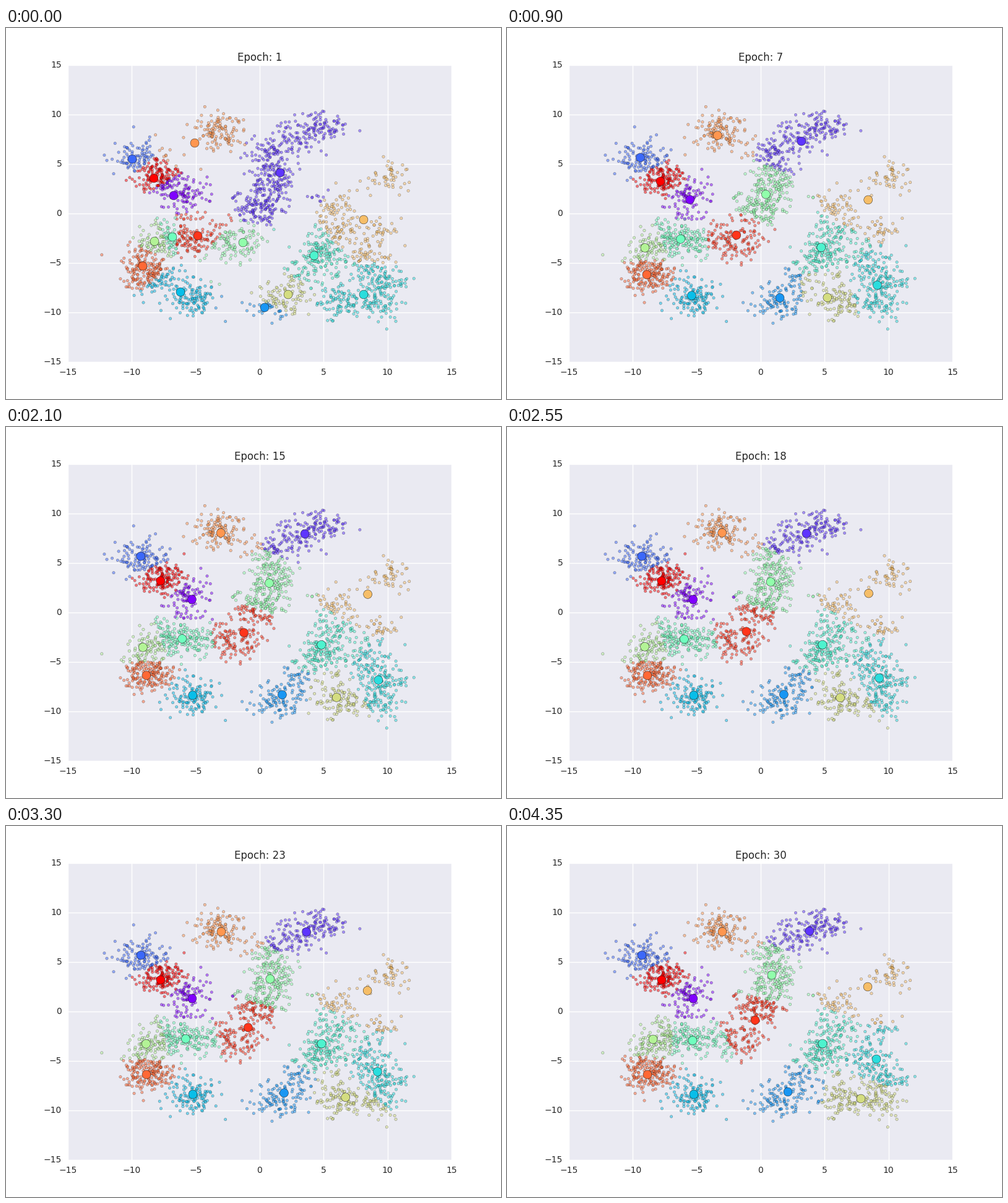
Write a matplotlib script that moves like this. It is 800 px wide and 600 px high and loops after 4.5 s.

```python
import numpy as np
import matplotlib.pyplot as plt
from matplotlib.animation import FuncAnimation

EPOCHS = 30
STEP_MS = 150
SPREAD = 0.97   # standard deviation of every blob
SETTLE = 3.5    # epochs for the quick early motion to fade
INK = "#262626"

plt.rcParams["font.family"] = "DejaVu Sans"
rng = np.random.default_rng(7)

# Blob centre and number of points
BLOBS = [
    (10.3, 3.8, 50), (5.8, 0.9, 55), (9.4, -1.9, 45), (9.6, -6.4, 95),
    (8.0, -4.3, 60), (9.2, -9.0, 85), (6.2, -8.8, 90), (4.5, -4.0, 125),
    (5.9, -2.2, 80), (3.4, -7.0, 65), (1.2, -9.0, 85), (-1.6, -2.9, 95),
    (-4.4, -2.5, 80), (-6.8, -2.5, 145), (-9.0, -3.6, 70), (-8.8, -6.1, 180),
    (-5.2, -8.4, 125), (-7.7, 3.5, 155), (-5.6, 1.6, 90), (-9.5, 5.7, 105),
    (-3.3, 8.3, 120), (0.8, 5.8, 95), (1.2, 3.4, 110), (0.1, 0.7, 150),
    (3.2, 7.9, 75), (5.0, 8.6, 75),
]

# Centroids on the stage: start, resting place and, for some, a late goal
PATHS = [
    [(271, 271), (301, 279)],
    [(443, 234), (483, 172), (489, 170)],
    [(204, 212), (218, 209)],
    [(418, 452), (446, 433), (454, 430)],
    [(282, 427), (302, 434)],
    [(578, 431), (603, 413), (597, 377)],
    [(498, 368), (510, 352)],
    [(269, 338), (283, 342), (300, 347)],
    [(383, 347), (426, 252), (428, 241)],
    [(240, 345), (219, 358), (236, 345)],
    [(456, 431), (531, 437), (572, 441)],
    [(578, 310), (585, 271), (583, 260)],
    [(305, 186), (348, 171)],
    [(221, 385), (227, 402)],
    [(310, 336), (384, 335), (401, 314)],
    [(239, 243), (250, 249)],
]
START, REST, GOAL = (
    np.array([path[min(i, len(path) - 1)] for path in PATHS], dtype=float)
    for i in range(3))


def centroids(epoch):
    """Quick decay from start to rest, then a slow drift to the goal."""
    age = epoch - 1
    decay = np.exp(-age / SETTLE)
    drift = (age / (EPOCHS - 1)) ** 3
    px = REST + (START - REST) * decay + (GOAL - REST) * drift
    return (px - (410, 300)) * (30 / 620, -30 / 480)


def nearest(points, centres):
    gaps = points[:, None, :] - centres[None, :, :]
    return (gaps ** 2).sum(axis=2).argmin(axis=1)


points = rng.permutation(np.concatenate(
    [rng.normal((x, y), SPREAD, (n, 2)) for x, y, n in BLOBS]))
colors = plt.cm.rainbow(np.linspace(0, 1, len(PATHS)))

fig = plt.figure(figsize=(8, 6), dpi=100, facecolor="white")
ax = fig.add_axes([0.125, 0.1, 0.775, 0.8], facecolor="#eaeaf2")
ax.set(xlim=(-15, 15), ylim=(-15, 15),
       xticks=range(-15, 16, 5), yticks=range(-15, 16, 5))
ax.set_axisbelow(True)
ax.grid(color="white", linewidth=1, linestyle="-")
ax.tick_params(length=0, pad=7, labelsize=10, labelcolor=INK)
plt.setp(ax.get_yticklabels(), va="center")
for spine in ax.spines.values():
    spine.set_visible(False)

title = ax.set_title("", fontsize=12, color=INK, pad=5, x=0.5005)
dots = ax.scatter(*points.T, s=10, alpha=0.5, linewidths=0.3,
                  edgecolors="black", zorder=2)
marks = ax.scatter(*centroids(1).T, s=100, c=colors, linewidths=0.3,
                   edgecolors="black", zorder=3)


def update(frame):
    epoch = frame + 1
    # labels come from the centroids of the epoch before
    dots.set_facecolor(colors[nearest(points, centroids(epoch - 1))])
    marks.set_offsets(centroids(epoch))
    title.set_text(f"Epoch: {epoch}")
    return dots, marks, title


anim = FuncAnimation(fig, update, frames=EPOCHS, interval=STEP_MS,
                     repeat=True, repeat_delay=0, blit=False)
plt.show()
```
